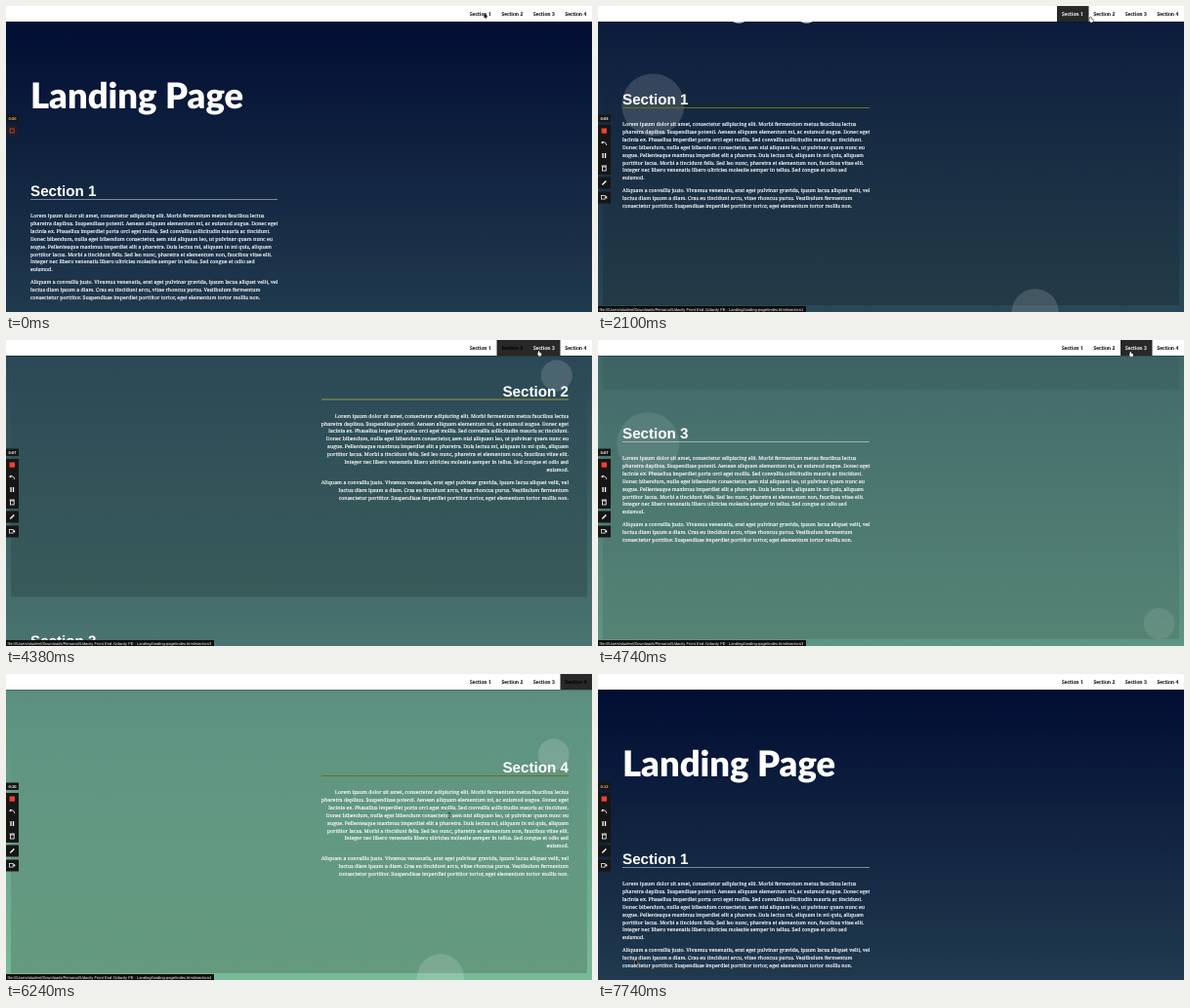
An HTML page with a canvas that plays this animation: 600x314 px, repeating every 7800 ms.

```html
<!DOCTYPE html>
<html lang="en">
<head>
<meta charset="utf-8">
<title>Landing Page</title>
<style>
html, body { margin: 0; width: 100%; height: 100%; overflow: hidden; background: #fff; }
canvas { display: block; width: 600px; height: 314px; }
</style>
</head>
<body>
<canvas id="stage"></canvas>
<script>
const W = 600, H = 314, LOOP = 7800, STEP = 60;
const PAGE = 1257, FIRST = 94, GAP = 256, FOOT = 1200;
const NAV_X = 470, NAV_W = 32.5, NAV_H = 16;
const SCROLL = 420, FADE = 350, EM = 6.4;
const canvas = document.getElementById('stage');
const dpr = window.devicePixelRatio || 1;
canvas.width = W * dpr;
canvas.height = H * dpr;
const ctx = canvas.getContext('2d');

const SERIF = '"Noto Serif", serif';
const SANS = '"Liberation Sans", Arial, sans-serif';

const copy = [
  'Lorem ipsum dolor sit amet, consectetur adipiscing elit. Morbi fermentum metus faucibus lectus',
  'pharetra dapibus. Suspendisse potenti. Aenean aliquam elementum mi, ac euismod augue. Donec eget',
  'lacinia ex. Phasellus imperdiet porta orci eget mollis. Sed convallis sollicitudin mauris ac tincidunt.',
  'Donec bibendum, nulla eget bibendum consectetur, sem nisi aliquam leo, ut pulvinar quam nunc eu',
  'augue. Pellentesque maximus imperdiet elit a pharetra. Duis lectus mi, aliquam in mi quis, aliquam',
  'porttitor lacus. Morbi a tincidunt felis. Sed leo nunc, pharetra et elementum non, faucibus vitae elit.',
  'Integer nec libero venenatis libero ultricies molestie semper in tellus. Sed congue et odio sed',
  'euismod.',
  'Aliquam a convallis justo. Vivamus venenatis, erat eget pulvinar gravida, ipsum lacus aliquet velit, vel',
  'luctus diam ipsum a diam. Cras eu tincidunt arcu, vitae rhoncus purus. Vestibulum fermentum',
  'consectetur porttitor. Suspendisse imperdiet porttitor tortor, eget elementum tortor mollis non.'
];

// scroll starts: the four sections, the page bottom, back to top
const starts = [440, 2870, 4270, 5400, 6460, 7210];
const stopY = i => i < 4 ? FIRST + GAP * i : i === 4 ? PAGE - H : 0;
const activeFrom = i => starts[i] + 0.6 * SCROLL;

// pointer keys: time, x, y
const path = [
  [0, 491, 10], [1900, 491, 9], [2100, 505, 14], [2340, 520, 12], [3300, 521, 12.5],
  [3720, 547, 12], [4740, 546, 14.5], [5200, 580, 10], [5980, 580, 10],
  [6240, 454, 145], [6900, 421, 192], [7120, 42, 294], [LOOP, 39, 296]
];

const clamp = v => Math.max(0, Math.min(1, v));
const ease = p => p * p * (3 - 2 * p);
const mix = (a, b, p) => a + (b - a) * p;

function scrollAt(t) {
  return starts.reduce((y, at, i) => mix(y, stopY(i), ease(clamp((t - at) / SCROLL))), 0);
}

function activity(t, i) {
  return clamp((t - activeFrom(i)) / FADE) - clamp((t - activeFrom(i + 1)) / FADE);
}

function pointerAt(t) {
  const i = path.findIndex(k => k[0] > t);
  const a = path[i - 1], b = path[i], p = ease((t - a[0]) / (b[0] - a[0]));
  return [mix(a[1], b[1], p), mix(a[2], b[2], p)];
}

function hoverAt(t) {
  if (t < 120) return -1;
  const [x, y] = pointerAt(t);
  return y < NAV_H ? Math.floor((x - 3 - NAV_X) / NAV_W) : -1;
}

function rect(x, y, w, h, color) {
  ctx.fillStyle = color;
  ctx.fillRect(x, y, w, h);
}

function text(str, x, y, font, color, align = 'left') {
  ctx.font = font;
  ctx.fillStyle = color;
  ctx.textAlign = align;
  ctx.fillText(str, x, y);
}

// slightly heavier serif
function serif(str, x, y, size, color, align) {
  text(str, x, y, size + 'px ' + SERIF, color, align);
  ctx.strokeStyle = color;
  ctx.lineWidth = 0.18;
  ctx.strokeText(str, x, y);
}

function poly(points, fill, stroke, width = 0.7) {
  ctx.beginPath();
  points.forEach(([x, y]) => ctx.lineTo(x, y));
  ctx.closePath();
  if (stroke) { ctx.strokeStyle = stroke; ctx.lineWidth = width; ctx.stroke(); }
  if (fill) { ctx.fillStyle = fill; ctx.fill(); }
}

function fade(y0, y1, from, to) {
  const g = ctx.createLinearGradient(0, y0, 0, y1);
  g.addColorStop(0, from);
  g.addColorStop(1, to);
  return g;
}

// circles one em around its place, starting on the left; rests there when turns is null
function disc(x, y, r, turns, alpha) {
  const a = Math.PI * (1 + 2 * turns), d = turns === null ? 0 : EM;
  ctx.fillStyle = `rgba(255,255,255,${0.15 * alpha})`;
  ctx.beginPath();
  ctx.arc(x + d * Math.cos(a), y + d * Math.sin(a), r, 0, 7);
  ctx.fill();
}

function drawSection(i, t, scroll) {
  const top = stopY(i) - scroll;
  if (Math.abs(top) > H) return;
  ctx.save();
  ctx.translate(0, top);
  const even = i % 2 === 1;
  const x = even ? 576 : 25, ruleX = even ? 323 : 25, align = even ? 'right' : 'left';
  const glow = activity(t, i);

  if (glow > 0) {
    rect(5, 56, 590, 251, fade(56, 307, 'rgba(0,0,0,0)', `rgba(0,0,0,${0.17 * glow})`));
    const age = t - activeFrom(i), live = t < activeFrom(i + 1);
    const turn = period => live ? age / period : null;
    if (even) disc(566, 86, 16, turn(6400), glow);
    else disc(57.5, 107.7, 32, turn(6400), glow);
    if (i % 3 === 0) disc(450.5, 308.5, 24, turn(-8000), glow);
    if (i % 3 === 2) disc(581, 290, 16, turn(-8000), glow);
  }

  text('Section ' + (i + 1), x, 101.4, 'bold 15.2px ' + SANS, '#fff', align);
  rect(ruleX, 104, 253, 1, 'rgba(255,255,255,0.45)');
  if (i % 3 < 2) rect(ruleX, 104, 253, 1, `rgba(108,116,10,${clamp(2 * glow)})`);
  copy.forEach((line, n) => {
    serif(line, x, 123.2 + n * 7.87 + (n > 7 ? 5.1 : 0), 5.22, 'rgba(255,255,255,0.95)', align);
  });
  ctx.restore();
}

function drawFooter(scroll) {
  const y = FOOT - scroll;
  if (y > H) return;
  rect(0, y, W, PAGE - FOOT, '#000');
  serif('© Quellin', 15, y + 25.7, 5.3, '#fff');
  rect(15, y + 33, 32, 8.5, '#f2f2f2');
  text('Back to Top', 17, y + 38.8, '4.1px ' + SANS, '#000');
  rect(41, y + 35, 1.2, 3, '#b5a64a');
  rect(40.2, y + 37, 3.8, 2.6, '#b5a64a');
}

function drawNav(t) {
  rect(0, NAV_H, W, 0.6, 'rgba(0,0,0,0.35)');
  rect(0, 0, W, NAV_H, '#fff');
  const hover = hoverAt(t);
  for (let i = 0; i < 4; i++) {
    const x = NAV_X + i * NAV_W;
    const p = i === hover ? 1 : activity(t, i) > 0 && t < activeFrom(i + 1) ? 1 : 0;
    if (p) rect(x, 0, NAV_W, NAV_H, '#282828');
    serif('Section ' + (i + 1), x + 5, 9.9, 5.1, i === hover ? '#fff' : '#000');
  }
}

function drawRecorder(t) {
  const start = t < 120, warm = start || t >= 7680;
  const sec = String(Math.floor(t / 600)).padStart(2, '0');
  const dark = '#161616';
  rect(0, 111.5, 13, 7.5, dark);
  text('0:' + sec, 6.5, 116.8, 'bold 4.1px ' + SANS, warm ? '#f0b070' : '#fff', 'center');
  ctx.lineWidth = 0.8;
  if (start) {
    rect(1, 123, 10.5, 9.5, '#2c1a20');
    ctx.strokeStyle = '#c0502c';
    ctx.strokeRect(4.2, 126, 4, 4);
    return;
  }
  rect(0, 122, 13, 51, dark);
  rect(0, 175.5, 13, 12, dark);
  rect(0, 190.5, 13, 12, dark);
  rect(3.6, 125.5, 5.4, 5.2, '#f0402c');
  ctx.strokeStyle = '#fff';
  ctx.beginPath();
  ctx.moveTo(4, 140);
  ctx.quadraticCurveTo(8, 138.5, 8.8, 143);
  ctx.stroke();
  poly([[3, 140.3], [5.2, 138.4], [5.4, 141.6]], '#fff');
  rect(4.4, 151, 1.3, 5, '#fff');
  rect(6.9, 151, 1.3, 5, '#fff');
  rect(3.6, 163.6, 5.4, 0.9, '#fff');
  ctx.strokeRect(4.4, 165, 3.8, 4);
  poly([[4.3, 183.4], [8.3, 179.6]], null, '#fff', 1.4);
  ctx.lineWidth = 0.7;
  ctx.strokeRect(3.6, 194.6, 3.6, 3.5);
  poly([[7.4, 196.3], [9.2, 194.8], [9.2, 198]], '#fff');
}

function drawStatus(t) {
  const link = hoverAt(t - 240);
  if (link < 0) return;
  rect(0, 308, 213, 6, '#0c0c0c');
  text('file:///Users/student/Downloads/Personal/Udacity Front End /Udacity FE - Landing/landing-page/index.html#section' + (link + 1),
    1.5, 312.5, '4.07px ' + SANS, '#fff');
}

function drawPointer(t, scroll) {
  const [x, y] = pointerAt(t);
  const onButton = x < 60 && scroll > 900;
  ctx.save();
  ctx.translate(x, y);
  if (hoverAt(t) >= 0 || onButton) {
    poly([[-1, -2.6], [-0.1, -2.6], [0, -0.7], [2, -0.2], [2, 1.4], [1.3, 2.7], [-1, 2.7], [-2, 0.7]], '#fff', '#111', 1);
  } else if (y > NAV_H && x > 60) {
    rect(-0.4, -3, 0.8, 6, '#222');
    rect(-1.3, -3.2, 2.6, 0.6, '#333');
    rect(-1.3, 2.6, 2.6, 0.6, '#333');
  } else {
    poly([[-1.5, -3], [-1.5, 2.4], [-0.3, 1.4], [0.6, 3], [1.4, 2.6], [0.7, 1], [2.2, 0.9]], '#000', '#fff');
  }
  ctx.restore();
}

function draw(t) {
  const scroll = scrollAt(t);
  ctx.setTransform(dpr, 0, 0, dpr, 0, 0);
  ctx.textRendering = 'geometricPrecision';
  rect(0, 0, W, H, fade(-scroll, PAGE - scroll, 'rgb(0,11,50)', 'rgb(130,198,160)'));
  text('Landing Page', 25, 104.6 - scroll, '900 36.4px Lato, sans-serif', '#fff');
  for (let i = 0; i < 4; i++) drawSection(i, t, scroll);
  drawFooter(scroll);
  drawNav(t);
  drawRecorder(t);
  drawStatus(t);
  drawPointer(t, scroll);
}

function tick() {
  const t = performance.now() % LOOP;
  draw(Math.floor(t / STEP) * STEP);
  requestAnimationFrame(tick);
}
tick();
</script>
</body>
</html>
```
